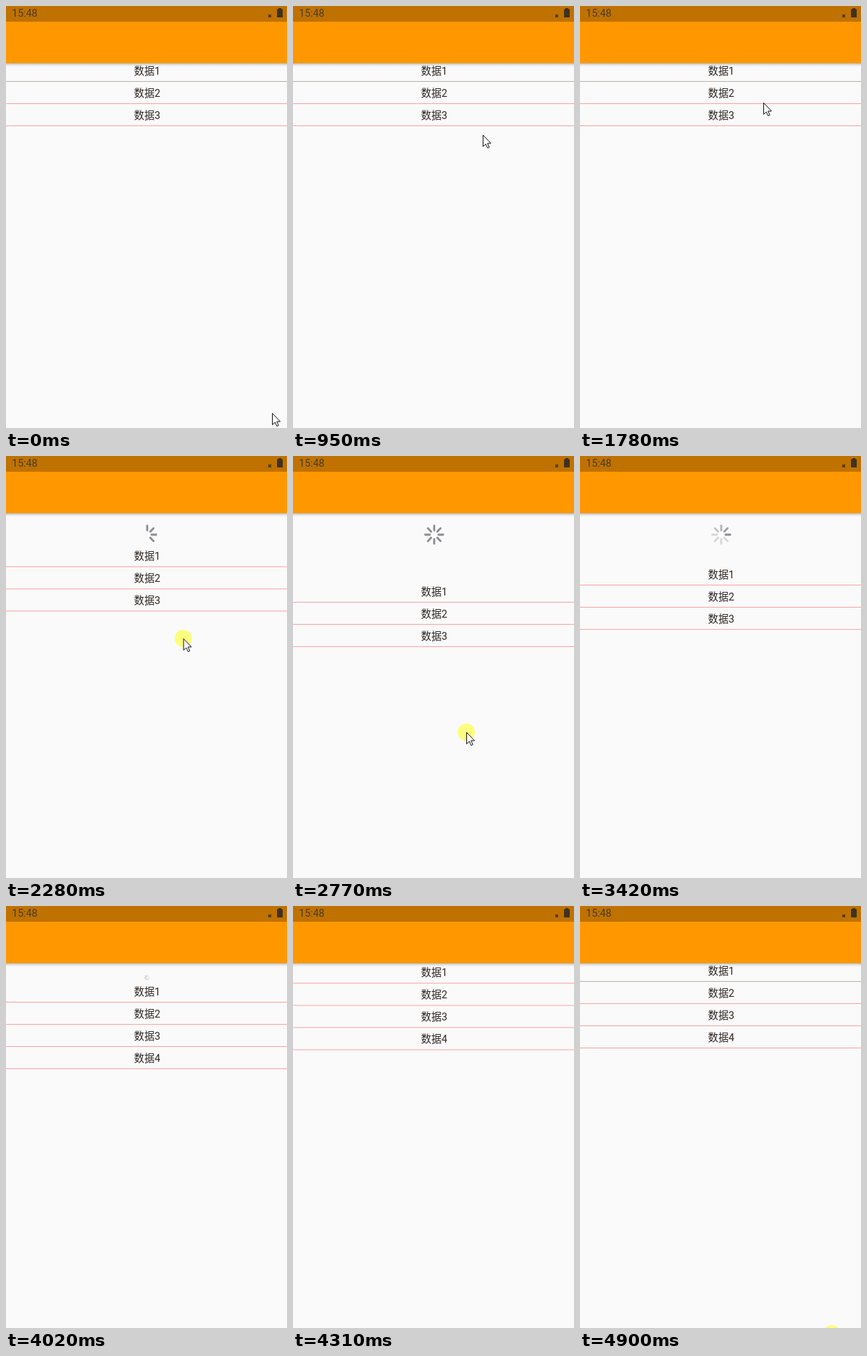
An HTML page that plays this animation: 394 px wide and 590 px high, repeating every 4970 ms.

```html
<!DOCTYPE html>
<html lang="zh">
<head>
<meta charset="utf-8">
<title>Pull to refresh</title>
<style>
  html, body { margin: 0; width: 100%; height: 100%; overflow: hidden; background: #fafafa; }
  svg { display: block; width: 394px; height: 590px; }
  text { font: 14.4px Roboto, "Noto Sans CJK SC", "Noto Sans CJK JP", "Noto Sans CJK", sans-serif; }
</style>
</head>
<body>
<svg viewBox="0 0 394 590">
  <defs>
    <linearGradient id="shade" x2="0" y2="1">
      <stop offset="0" stop-color="#000" stop-opacity=".28"/>
      <stop offset=".4" stop-color="#000" stop-opacity=".1"/>
      <stop offset="1" stop-color="#000" stop-opacity="0"/>
    </linearGradient>
  </defs>
  <rect width="394" height="590" fill="#fafafa"/>
  <g id="spinner" fill="#3c3c44"></g>
  <g id="list"></g>
  <rect y="80" width="394" height="5" fill="url(#shade)"/>
  <rect width="394" height="80" fill="#ff9800"/>
  <rect width="394" height="22" fill="#bf7200"/>
  <text x="8.3" y="15.2" fill="#4b3a26">15:48</text>
  <path d="M368 12l3.6 3.6M371.6 12l-3.6 3.6" stroke="#3d3020" stroke-width="1.5"/>
  <path d="M382 3h4v1.2h1.2q.8 0 .8.8v10.2q0 .8-.8.8h-6.4q-.8 0-.8-.8V5q0-.8.8-.8H382z" fill="#40321f"/>
  <g id="pointer">
    <circle id="press" r="12" fill="#ff0" opacity=".5"/>
    <path d="M.5.5V16.5L4.2 13 6.8 18.6 9.2 17.5 6.7 12H11.5Z" fill="#fff" stroke="#111"/>
  </g>
</svg>
<script>
const LOOP = 4970, STEP = 70;
const PRESS = 2070, RELEASE = 3050, SPIN = 2985, DONE = 3880;
const ROW = 31, HOLD = 60, TRIGGER = 100, VIEWPORT = 510, START_Y = 150;

// The screen refreshes in short runs of regular steps.
const RUNS = [0, 70, 400, 950, 1500, 2070, 2630, 3210, 3750, 3880, 4440, 4900];

// Pointer strokes: [time, x, y]; the pointer is hidden between strokes.
const STROKES = [
  { until: 70, keys: [[0, 373, 569]] },
  { from: 400, until: RELEASE, keys: [
    [400, 352, 263], [880, 273, 182], [950, 266, 180], [1120, 233, 240],
    [1270, 250, 314], [1380, 292, 260], [1430, 285, 226], [1780, 257, 135],
    [1900, 240, 125], [2070, 262, 150], [2350, 244, 290], [2560, 243, 364],
    [2770, 243, 386], [2910, 242, 432], [3040, 238, 495]] },
  { from: 4900, until: LOOP, keys: [[4900, 353, 598]] }
];

const $ = id => document.getElementById(id);
const spinner = $("spinner"), list = $("list"), pointer = $("pointer"), press = $("press");
const clamp = (v, lo = 0, hi = 1) => Math.min(hi, Math.max(lo, v));

function add(parent, tag, attrs) {
  const el = document.createElementNS("http://www.w3.org/2000/svg", tag);
  for (const key in attrs) el.setAttribute(key, attrs[key]);
  return parent.appendChild(el);
}

const ticks = Array.from({ length: 8 }, (_, i) => add(spinner, "rect", {
  x: -1.4, y: -14, width: 2.8, height: 9.33, rx: 1.4, transform: `rotate(${i * 45})`
}));

const rows = Array.from({ length: 4 }, (_, i) => {
  const g = add(list, "g", { transform: `translate(0 ${i * ROW})` });
  add(g, "text", { x: 198, y: 96, "text-anchor": "middle", fill: "#2a2522" }).textContent = "数据" + (i + 1);
  const line = add(g, "rect", { y: 105, width: 394, height: 1, fill: "#f6a3a0" });
  return { g, line };
});

function snap(t) {
  const start = RUNS.filter(r => r <= t).pop();
  return start + Math.floor((t - start) / STEP) * STEP;
}

function along(keys, t) {
  const i = keys.findIndex(k => k[0] > t);
  if (i < 0) return keys[keys.length - 1].slice(1);
  const a = keys[Math.max(0, i - 1)], b = keys[i];
  const p = clamp((t - a[0]) / (b[0] - a[0] || 1));
  return [1, 2].map(n => a[n] + (b[n] - a[n]) * p);
}

// Overscroll resistance: the list lags further behind the finger the more it is pulled.
function pulled(fingerY) {
  const d = 0.52 * Math.max(0, fingerY - START_Y);
  return d / (1 + d / VIEWPORT);
}

function settle(t) {
  const from = pulled(495), k = 0.008 * (t - RELEASE);
  return HOLD + (from - HOLD) * (1 + k) * Math.exp(-k);
}

function listOffset(t) {
  if (t < PRESS) return 0;
  if (t < RELEASE) return pulled(along(STROKES[1].keys, t)[1]);
  if (t < DONE) return settle(t);
  return settle(DONE) * (1 - clamp((t - DONE) / 640)) ** 3;
}

function drawSpinner(t, offset) {
  const pull = clamp(offset / TRIGGER), spinning = t >= SPIN;
  const scale = t >= DONE ? pull : 1;
  const fade = clamp(pull / 0.35);
  const active = Math.floor((t - SPIN) / 125);
  spinner.setAttribute("transform", `translate(198 ${96 + 14 * scale}) scale(${scale})`);
  spinner.setAttribute("opacity", spinning ? 1 : fade * fade * (3 - 2 * fade));
  ticks.forEach((tick, i) => {
    const order = ((i - active) % 8 + 8) % 8;
    const alpha = spinning ? 47 + 25 * Math.max(0, order - 3) : i < 8 * pull ? 147 : 0;
    tick.setAttribute("fill-opacity", alpha / 255);
  });
}

function drawPointer(t) {
  const stroke = STROKES.find(s => t >= (s.from || 0) && t < s.until);
  pointer.style.display = stroke ? "" : "none";
  if (!stroke) return;
  pointer.setAttribute("transform", `translate(${along(stroke.keys, t)})`);
  press.style.display = t >= PRESS ? "" : "none";
}

function render(time) {
  const t = snap(time % LOOP), offset = listOffset(t);
  list.setAttribute("transform", `translate(0 ${offset.toFixed(2)})`);
  rows[0].line.setAttribute("fill", offset < 0.5 ? "#b8b0aa" : "#f6a3a0");
  rows[3].g.style.display = t >= DONE ? "" : "none";
  drawSpinner(t, offset);
  drawPointer(t);
}

const origin = performance.now();
function loop() {
  render(performance.now() - origin);
  requestAnimationFrame(loop);
}
loop();
</script>
</body>
</html>
```
